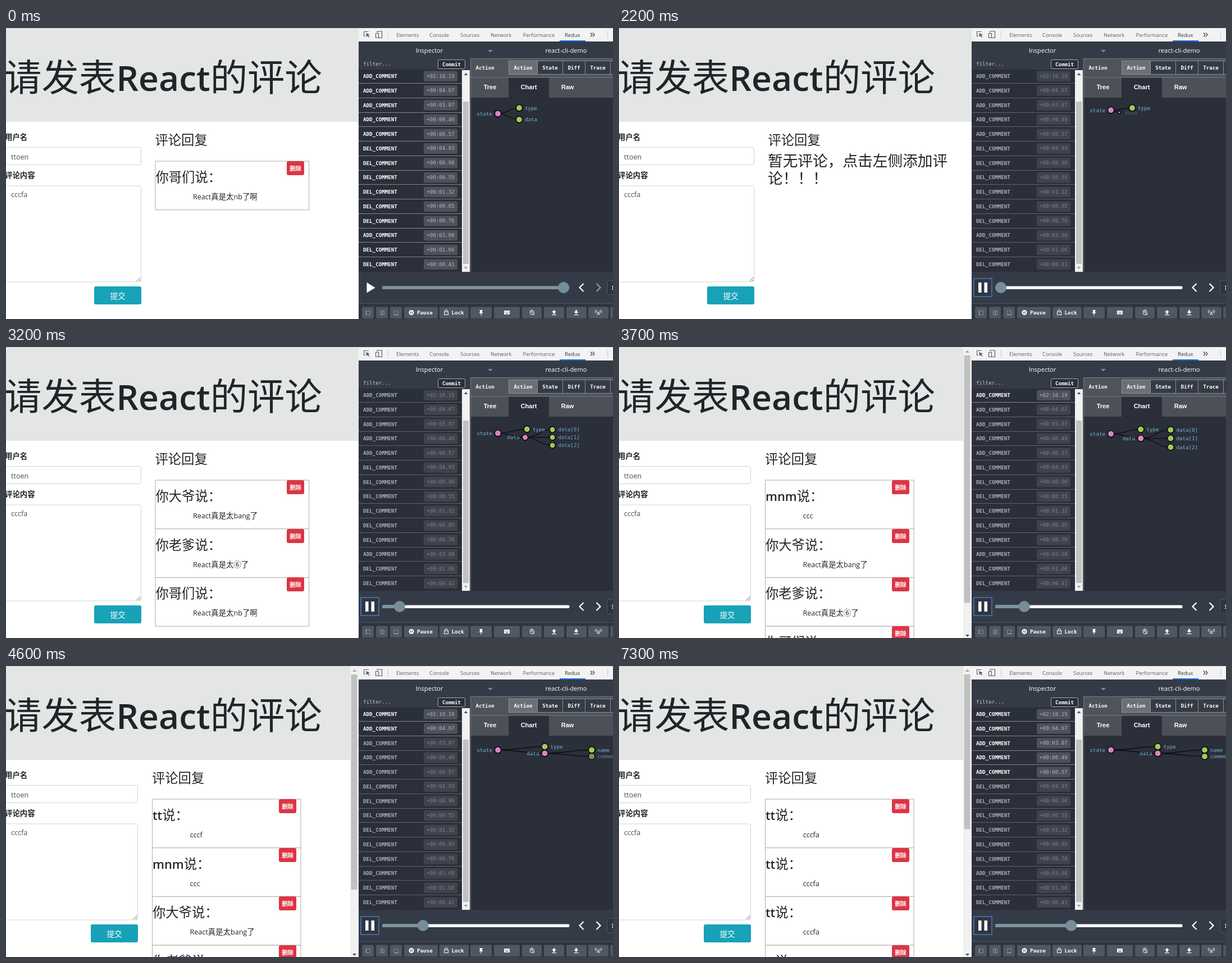
An HTML page for the animation above (8000 ms loop, 1081 by 518 pixels).

```html
<!DOCTYPE html>
<html lang="zh">
<head>
<meta charset="utf-8">
<style>
html, body { margin: 0; width: 100%; height: 100%; overflow: hidden; background: #fff; }
svg { display: block; width: 1081px; height: 518px; }
text { white-space: pre; }
.page { font-family: "Noto Sans CJK SC", "Noto Sans CJK", "Open Sans", sans-serif; fill: #212529; }
.latin { font-family: "Open Sans", "Noto Sans", sans-serif; }
.mono { font: 9.2px "DejaVu Sans Mono", monospace; }
.tab { font: bold 11px "Liberation Sans", sans-serif; fill: #fff; }
.b { font-weight: bold; }
</style>
</head>
<body>
<svg viewBox="0 0 1081 518">
  <g id="page" class="page"></g>
  <g id="tools"></g>
  <g id="actions"></g>
  <g id="chart"></g>
  <g id="player"></g>
</svg>
<script>
const LOOP = 8000, PLAY = 900, CLEAR = 1800, START = 1900, STEP = 900, LAST = 15, EASE_MS = 555;

const rect = (x, y, w, h, fill, extra = '') =>
  `<rect x="${x}" y="${y}" width="${w}" height="${h}" fill="${fill}" ${extra}/>`;
const path = (d, stroke, width = 1, extra = '') =>
  `<path d="${d}" fill="none" stroke="${stroke}" stroke-width="${width}" ${extra}/>`;
const fill = (d, color) => `<path d="${d}" fill="${color}"/>`;
const text = (x, y, str, extra = '') => `<text x="${x}" y="${y}" ${extra}>${str}</text>`;
const mono = (x, y, str, color = '#fff', extra = '', bold = true) =>
  text(x, y, str, `class="mono${bold ? ' b' : ''}" fill="${color}" ${extra}`);
const MID = 'text-anchor="middle"';

// Latin runs are set a little smaller beside the Chinese characters.
const mixed = (x, y, size, str, weight = 400, extra = '') => {
  const runs = str.replace(/[A-Za-z]+/g, run =>
    `<tspan class="latin" font-size="${size * .94}" font-weight="${weight}">${run}</tspan>`);
  return text(x, y, runs, `font-size="${size}" ${extra}`);
};

const OLDER = [['你大爷', 'React真是太bang了'], ['你老爹', 'React真是太⑥了'], ['你哥们', 'React真是太nb了啊']];
const ADDED = [['mnm', 'ccc'], ['tt', 'cccf'], ['tt', 'cccfa'], ['tt', 'cccfa'], ['tt', 'cccfa']];

function commentsAt(t, step) {
  if (t < CLEAR) return [OLDER[2]];
  if (step === LAST || step < 1) return [];
  return ADDED.slice(0, step - 1).reverse().concat(OLDER);
}

function drawPage(t, step) {
  const list = commentsAt(t, step), scrolls = list.length > 3;
  const width = scrolls ? 613 : 628;
  const formRight = scrolls ? 234.5 : 240.5;
  const left = scrolls ? 260.5 : 266, right = scrolls ? 525 : 539.5;
  const deleteX = scrolls ? 486 : 500;
  const field = (y, h) => rect(-10, y, formRight + 10, h, '#fff', 'rx="3.5" stroke="#ced4da"');
  let s = rect(0, 0, width, 167, '#e4e5e5') + rect(0, 0, width, 1, '#d3d5d5') +
    mixed(-3, 112, 66.4, '请发表React的评论', 600) +
    mixed(-2, 199, 13.4, '用户名', 700, 'class="b"') + field(212.5, 31) +
    mixed(9, 234, 13.4, 'ttoen', 400, 'fill="#495057"') +
    mixed(-2, 267, 13.4, '评论内容', 700, 'class="b"') + field(281, 171) +
    mixed(9, 301, 13.4, 'cccfa', 400, 'fill="#495057"') +
    path(`M${formRight - 8} 451l7 -7m-3 7l3 -3`, '#666') +
    rect(formRight - 83.5, 460, 84, 32, '#17a2b8', 'rx="3"') +
    mixed(formRight - 41.5, 481.5, 13.6, '提交', 400, MID + ' fill="#fff"') +
    mixed(left - .5, 207.5, 23.3, '评论回复');

  if (!list.length)
    s += mixed(265, 245.5, 26.7, '暂无评论，点击左侧添加评') + mixed(265, 276.5, 26.7, '论！！！');

  list.forEach(([name, body], i) => {
    const y = 237 + i * 86.7;
    if (y > 518) return;
    s += rect(left, y, right - left, 86.7, '#fff', 'stroke="#adadad"') +
      mixed(left + .5, y + 37, 23.3, name + '说：', 600) +
      mixed(left + 67, y + 68, 13.4, body) +
      rect(deleteX, Math.round(y), 31, 25, '#dc3545', 'rx="3"') +
      mixed(deleteX + 15.5, y + 17, 10.3, '删除', 400, MID + ' fill="#fff" class="b"');
  });

  if (scrolls) {
    const thumb = 494 * 518 / (581 + 87 * (list.length - 4));
    s += rect(613, 0, 15, 518, '#f1f1f1') + rect(614.5, 15, 11, thumb, '#c1c1c1') +
      fill('M617 10l3.5 -4 3.5 4z', '#a0a0a0') + fill('M617 512l3.5 4 3.5 -4z', '#505050');
  }
  return s;
}

function drawTools() {
  const label = (x, str, color = '#5a5d61') =>
    text(x, 16, str, `class="latin" font-size="9.4" fill="${color}"`);
  const title = (x, str) =>
    text(x, 44, str, `class="latin" font-size="11.1" font-weight="500" fill="#fff" ${MID}`);

  let s = rect(628, 0, 453, 24, '#f3f3f3') + rect(628, 0, 453, 1, '#d5d5d5') +
    path('M645 7V6.5H637.5V14.5H640', '#5a5d61', 1.2) + fill('M641 9l7 3 -3 1 2.500 3 -1.500 1 -2 -3 -2 2z', '#5a5d61') +
    path('M661 8V6H669.500V17.500H664M658.500 9.500H663.500V17.500H658.500z', '#5a5d61', 1.2) +
    path('M680.500 5V19M1071.500 5V19', '#ccc') +
    label(695, 'Elements') + label(754, 'Console') + label(809, 'Sources') + label(863, 'Network') +
    label(920.5, 'Performance') + label(995, 'Redux', '#333') +
    path('M1041 8.500l3 3.500 -3 3.500m4 -7l3 3.500 -3 3.500', '#444', 1.2) +
    rect(628, 24, 453, 494, '#353b46') + rect(986, 22, 46, 2, '#1a73e8') +
    title(754, 'Inspector') + title(997.5, 'react-cli-demo') + fill('M858 39h9l-4.500 4.500z', '#7f858e');

  s += rect(628, 54, 200, 380, '#2a2f3a') + rect(628, 54, 199, 20, '#353b46') +
    mono(636, 67, 'filter...', '#c4c6ca', '', false) +
    rect(769.5, 56.5, 48, 16, '#2a2f3a', 'rx="2" stroke="#a5a8ad"') + mono(793.5, 67.5, 'Commit', '#fff', MID) +
    rect(828, 54, 253, 34, '#4f545b') + rect(828, 88, 253, 36, '#4c5058') +
    rect(828, 124, 253, 310, '#2a2f3a') + rect(895, 88, 72, 36, '#2a2f3a') +
    path('M827.500 54V434M828 54.500H1081M828 88H1081', '#777b82') + mono(836.5, 74, 'Action');

  [['Action', 895, 51], ['State', 946, 45], ['Diff', 991, 40], ['Trace', 1031, 45]].forEach(([name, x, w], i) => {
    s += rect(x + .5, 58.5, w, 24, i ? '#353b46' : '#6c7076', 'stroke="#8d9096"') +
      mono(x + w / 2 + .5, 74, name, '#fff', MID);
  });
  s += rect(1076.5, 58.5, 10, 24, '#353b46', 'stroke="#8d9096"');
  [['Tree', 862], ['Chart', 931], ['Raw', 1000]].forEach(([name, x]) => {
    s += text(x, 109, name, `class="tab" ${MID}`);
  });

  s += rect(812, 75, 14, 359, '#f1f1f1') + rect(814, 131, 10, 289, '#c1c1c1') +
    fill('M815.500 84l3.500 -4 3.500 4z', '#555') + fill('M815.500 425l3.500 4 3.500 -4z', '#a3a3a3');
  return s + drawToolbar();
}

function drawToolbar() {
  const BG = '#4f5763', INK = '#fff';
  let s = rect(628, 490, 453, 28, '#2f343f') + path('M628 490.500H1081', '#505661');
  [[634, 21], [659, 21], [684, 21], [709, 60], [772, 52], [827, 38], [869, 46], [919, 35],
   [958, 36], [998, 36], [1037, 36], [1076, 20]].forEach(([x, w]) => {
    s += rect(x, 496.500, w, 20.500, BG, 'rx="2"');
  });
  [0, 1, 2].forEach(i => {
    const x = 641 + i * 25;
    s += rect(x + .5, 503.5, 7, 7, 'none', 'stroke="#a2a7ae" stroke-dasharray="1.500 1"') +
      path(i === 2 ? `M${x} 510.500h8` : `M${x + (i ? 4 : .5)} 503v8`, '#a2a7ae', 1.3);
  });
  s += `<circle cx="722" cy="506.500" r="4.500" fill="#fff"/>` + rect(720, 504.5, 1.3, 4, BG) + rect(722.7, 504.5, 1.3, 4, BG) +
    mono(732, 510, 'Pause') +
    rect(780.500, 505, 7, 5.500, 'none', 'stroke="#fff"') + path('M782 505v-1.500a2 2 0 0 1 4 0V505M783.500 507.700h1', INK) +
    mono(793.5, 510, 'Lock') +
    fill('M843 502h6v1h-1v3l1.500 2h-3v4h-1v-4h-3l1.500 -2v-3h-1z', INK) +
    rect(887, 503, 10, 7, INK, 'rx="1"') + path('M888.500 505h7m-7 2h7', BG, 1, 'stroke-dasharray="1 1"') + path('M890 508.500h4', BG) +
    `<circle cx="937" cy="507" r="3.700" fill="none" stroke="#fff"/>` + path('M932.500 502.500l8.500 8.500M937 505v2M935.500 502h3', INK) +
    fill('M976 502l4 4h-2.500v3h-3v-3h-2.500z', INK) + rect(972, 510, 8, 1.2, INK) +
    fill('M1015.500 509l-4 -4h2.500v-3h3v3h2.500z', INK) + rect(1011.5, 510, 8, 1.2, INK) +
    path('M1052.500 511l2.500 -6 2.500 6m-4 -2h3M1052.500 502.500q-1.500 2 0 4m5 -4q1.500 2 0 4M1050.500 501.500q-2.500 3 0 6m9 -6q2.500 3 0 6', INK, .9);
  return s;
}

const DELAYS = ['02:10.19', '00:04.67', '00:03.87', '00:00.49', '00:00.57', '00:04.93', '00:00.90', '00:00.55',
  '00:01.32', '00:00.85', '00:00.76', '00:03.08', '00:01.66', '00:00.41'];

function drawActions(step) {
  return DELAYS.map((delay, i) => {
    const y = 86 + i * 25.77, adds = i < 5 || i === 11;
    return `<g opacity="${i <= step - 2 ? 1 : .6}">` +
      mono(636, y + 3, adds ? 'ADD_COMMENT' : 'DEL_COMMENT') +
      rect(744, y - 9.500, 60, 18.500, '#4d515b', 'rx="2.500"') +
      mono(774, y + 2.5, '+' + delay, '#b4b6ba', MID, false) +
      (i < 13 ? path(`M628 ${Math.round(y + 12) + .5}H812`, '#81858c') : '') + '</g>';
  }).join('');
}

// A tree holds id -> [depth, y, parent]; gap is the distance between levels.
const ROOT = 876;
const tree = (gap, nodes) => Object.fromEntries(Object.entries(nodes).map(([id, [depth, y, parent]]) =>
  [id, { x: ROOT + depth * gap, y, parent, open: Object.values(nodes).some(n => n[2] === id) }]));
const TREES = {
  full: tree(38, { state: [0, 152.5], type: [1, 142.3, 'state'], data: [1, 163, 'state'] }),
  init: tree(38, { state: [0, 142.3], type: [1, 142.3, 'state'] }),
  list: tree(53.2, { state: [0, 154.6], type: [1, 146.6, 'state'], data: [1, 162.6, 'state'],
    'data[0]': [2, 147.4, 'data'], 'data[1]': [2, 162.6, 'data'], 'data[2]': [2, 178.2, 'data'] }),
  add: tree(83.5, { state: [0, 149.5], type: [1, 143.5, 'state'], data: [1, 155.5, 'state'],
    name: [2, 149.5, 'data'], commentText: [2, 161, 'data'] })
};
const SEQUENCE = ['init', 'list', 'add'];

const ease = u => u < .5 ? 4 * u ** 3 : 1 - 4 * (1 - u) ** 3;
const lerp = (a, b, p) => a + (b - a) * p;

function drawChart(t, step) {
  let from = TREES.full, to = TREES.full, p = 1;
  if (t >= START) {
    const k = Math.min(step, 2);
    from = k ? TREES[SEQUENCE[k - 1]] : TREES.full;
    to = TREES[SEQUENCE[k]];
    p = ease(Math.min(1, (t - START - k * STEP) / EASE_MS));
  }
  const flash = (step === 3 || step === 4) && t === START + step * STEP;
  const ids = [...new Set([...Object.keys(from), ...Object.keys(to)])]
    .filter(id => to[id] || p < 1);
  const now = {};
  ids.forEach(id => {
    const parent = (to[id] || from[id]).parent;
    const a = from[id] || from[parent] || from.state, b = to[id] || to[parent];
    now[id] = { x: lerp(a.x, b.x, p), y: lerp(a.y, b.y, p), parent,
      shown: !from[id] ? p : !to[id] ? 1 - p : 1, open: (to[id] || from[id]).open };
  });

  const links = ids.filter(id => now[id].parent).map(id => {
    const b = now[id], a = now[b.parent], m = (a.x + b.x) / 2;
    return path(`M${a.x} ${a.y}C${m} ${a.y} ${m} ${b.y} ${b.x} ${b.y}`, '#0b0d10', 1.3);
  }).join('');
  const dots = ids.map(id => {
    const n = now[id], dim = flash && id === 'commentText' ? .7 : 1;
    return `<g opacity="${dim}"><circle cx="${n.x}" cy="${n.y}" r="${5.7 * n.shown}" fill="${n.open ? '#d884c8' : '#a4c75a'}" stroke="#000" stroke-width="1.400"/>` +
      mono(n.x + (n.open ? -10 : 10), n.y + 3.3, id, '#74b4d4',
        `fill-opacity="${n.shown}" text-anchor="${n.open ? 'end' : 'start'}"`, false) + '</g>';
  }).join('');
  return links + dots;
}

function drawPlayer(t, step) {
  const x = 680 + step * (993 - 680) / LAST;
  const button = t < PLAY ? fill('M642.500 453v18.500l15 -9.250z', '#fff') :
    rect(632, 446, 32, 32, '#303641', 'stroke="#4a78c4" stroke-width="1.500"') +
    rect(640, 453, 5.5, 18, '#fff') + rect(650.5, 453, 5.5, 18, '#fff');
  return button + rect(670, 459.5, 333.5, 5.5, step === LAST ? '#7c949f' : '#f5f6f6', 'rx="2"') +
    rect(670, 459.5, x - 670, 5.5, '#7c949f', 'rx="2"') + `<circle cx="${x}" cy="462" r="10" fill="#768e9a"/>` +
    path('M1028.500 455l-7 7 7 7', '#fff', 2.2) +
    path('M1051.500 455l7 7 -7 7', step === LAST ? '#90959c' : '#fff', 2.2) +
    rect(1070.5, 449.5, 20, 25, '#2e3440', 'rx="2" stroke="#50555f"') + mono(1077.5, 466, '1x', '#fff', '', false);
}

const shown = {};
function put(id, markup) {
  if (shown[id] === markup) return;
  shown[id] = markup;
  document.getElementById(id).innerHTML = markup;
}

function render(time) {
  const t = Math.floor(time % LOOP / 100) * 100;
  const step = t < START ? LAST : Math.floor((t - START) / STEP);
  put('page', drawPage(t, step));
  put('actions', drawActions(step));
  put('chart', drawChart(t, step));
  put('player', drawPlayer(t, step));
}

put('tools', drawTools());
render(0);
let begin;
requestAnimationFrame(function tick(now) {
  begin ??= now;
  render(now - begin);
  requestAnimationFrame(tick);
});
</script>
</body>
</html>
```
